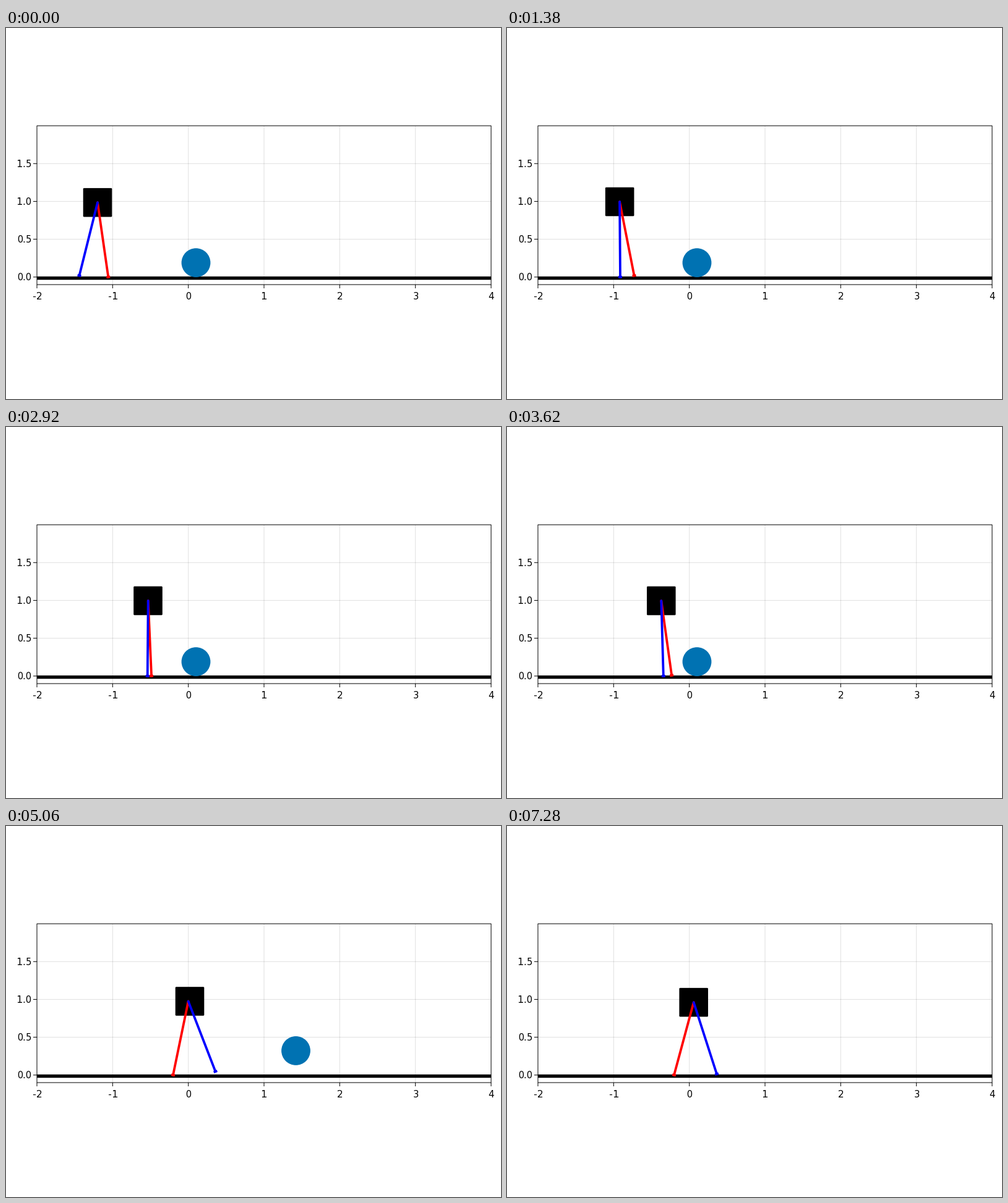
Animation, 800 px wide and 600 px high, one loop 8 s. Source, as a matplotlib script:

```python
import numpy as np
import matplotlib.pyplot as plt
from matplotlib.animation import FuncAnimation
from matplotlib.patches import Circle, FancyBboxPatch, Rectangle

W, H, DPI = 800, 600, 100
PX = 72 / DPI                      # one pixel in points
LEFT, RIGHT, TOP, BOTTOM = 50, 784, 158.1, 415
UNIT = (RIGHT - LEFT) / 6
GROUND = BOTTOM - 0.1 * UNIT
LEG = 121.8
BODY = 46.6
RADIUS = 23.4
BALL_X, BALL_Y = 307, 379.6
STRIDE, PERIOD = 34.9, 25
LAST_STEP = 156

plt.rcParams.update({
    "font.family": "DejaVu Sans",
    "path.snap": False,
    "text.hinting_factor": 1,      # whole-pixel glyph advances
})


def px(x):
    return LEFT + (x + 2) * UNIT


def py(y):
    return GROUND - y * UNIT


def smooth(keys):
    """Monotone cubic curve through (time, value) keys, flat outside."""
    t, v = np.array(sorted(keys), float).T
    h = np.diff(t)
    d = np.diff(v) / h
    m = np.zeros(len(t))
    for i in range(1, len(t) - 1):
        if d[i - 1] * d[i] > 0:
            m[i] = 2 * d[i - 1] * d[i] / (d[i - 1] + d[i])

    def curve(x):
        x = min(max(x, t[0]), t[-1])
        i = min(np.searchsorted(t, x, side="right") - 1, len(h) - 1)
        u = (x - t[i]) / h[i]
        return ((1 + 2 * u) * (1 - u) ** 2 * v[i] + u * (1 - u) ** 2 * h[i] * m[i]
                + u * u * (3 - 2 * u) * v[i + 1] + u * u * (u - 1) * h[i] * m[i + 1])

    return curve


def swings(start, x, count):
    """Foot keys for strides that overshoot and then pull back to land."""
    shape = [(0, 0), (1.5, 10.8), (5.5, 39), (8, 43), (12.5, STRIDE)]
    return [(start + k * PERIOD + t, x + k * STRIDE + dx)
            for k in range(count) for t, dx in shape]


body_x = smooth([(-6, 142), (0, 148), (17, 166.2), (41, 199.3), (62, 229.5),
                 (91, 268.3), (109, 297), (114, 301.7), (LAST_STEP, 301.7)])
hip_x = smooth([(-6, 142), (0, 148), (17, 166.2), (41, 199.2), (62, 229.7),
                (91, 267.8), (109, 294.6), (114, 301.7), (LAST_STEP, 301.7)])
red_x = smooth([(0, 165.3)] + swings(23, 165.3, 3) + [(LAST_STEP, 270)])
blue_x = smooth([(0, 118.5), (17, 195.5), (18.5, 197), (23, 183)]
                + swings(35.5, 183, 2)
                + [(85.5, 252.8), (87, 263), (89.6, 283), (91, 284.5),
                   (109, 338.5), (113, 339), (LAST_STEP, 339)])


def ball_position(n):
    """Rest, then a kick followed by damped bounces."""
    step = n - max(0, (n - 115) // 10)
    t = step - 89.45
    if t <= 0:
        return BALL_X, BALL_Y
    x = BALL_X + 8.26 * t
    lift, gravity = 4.62, 0.388
    while lift > 0.4 and t > 2 * lift / gravity:
        t -= 2 * lift / gravity
        lift *= 0.6
    height = lift * t - gravity * t * t / 2 if lift > 0.4 else 0
    return x, BALL_Y - max(0, height)


def step_at(frame):
    """Playback cadence: one long hold, then two short ones."""
    if frame == 0:
        return 0
    group, rest = divmod(frame - 1, 7)
    return min(1 + 3 * group + max(0, rest - 4), LAST_STEP)


fig = plt.figure(figsize=(W / DPI, H / DPI), dpi=DPI, facecolor="white")
ax = fig.add_axes([0, 0, 1, 1])
ax.set_xlim(0, W)
ax.set_ylim(H, 0)
ax.axis("off")


def line(xs, ys, color, width, z, **kw):
    kw.setdefault("solid_capstyle", "butt")
    return ax.plot(xs, ys, color=color, lw=width * PX, zorder=z, **kw)[0]


for value in range(-2, 5):
    x = px(value)
    if -2 < value < 4:
        line([x, x], [TOP, BOTTOM], "black", 1, 1, alpha=0.12)
    line([x, x], [BOTTOM, BOTTOM + 6], "black", 1, 6)
    ax.text(x + 0.5, 438.8, str(value), size=15 * PX, ha="center", va="baseline")
for value in (0, 0.5, 1, 1.5):
    y = py(value)
    line([LEFT, RIGHT], [y, y], "black", 1, 1, alpha=0.12)
    line([LEFT - 6, LEFT], [y, y], "black", 1, 6)
    ax.text(41.2, y + 5.4, f"{value:.1f}", size=15 * PX, ha="right", va="baseline")

frame_box = Rectangle((LEFT, TOP), RIGHT - LEFT, BOTTOM - TOP, fill=False,
                      ec="black", lw=PX, zorder=6)
ax.add_patch(frame_box)
line([LEFT, RIGHT], [404.5, 404.5], "black", 5.4, 2)

ball = Circle((0, 0), RADIUS, fc="#0072B2", ec="none", zorder=3)
ax.add_patch(ball)
ball.set_clip_path(frame_box)
body = FancyBboxPatch((0, 0), BODY, BODY, boxstyle="round,pad=0,rounding_size=1.5",
                      fc="black", ec="none", zorder=3)
ax.add_patch(body)
legs = []
for color, foot_x, z in (("red", red_x, 4), ("blue", blue_x, 5)):
    leg = line([], [], color, 3.8, z, solid_capstyle="round")
    foot = line([], [], color, 3.8, z)
    legs.append((leg, foot, foot_x))


def update(frame):
    n = step_at(frame)
    x = hip_x(n)
    # Both legs keep their length; the hip rides on the lower foot.
    reach = [np.sqrt(LEG ** 2 - (foot_x(n) - x) ** 2) for _, _, foot_x in legs]
    y = GROUND - max(reach)
    body.set_bounds(body_x(n) - BODY / 2, y - BODY / 2, BODY, BODY)
    for (leg, foot, foot_x), drop in zip(legs, reach):
        fx, fy = foot_x(n), y + drop
        leg.set_data([x, fx], [y, fy])
        nx, ny = 3 * drop / LEG, 3 * (x - fx) / LEG
        foot.set_data([fx - nx, fx + nx], [fy - ny, fy + ny])
    ball.center = ball_position(n)
    return [ball, body] + [part for item in legs for part in item[:2]]


anim = FuncAnimation(fig, update, frames=400, interval=20, repeat=True,
                     repeat_delay=0, init_func=lambda: update(0))
plt.show()
```
